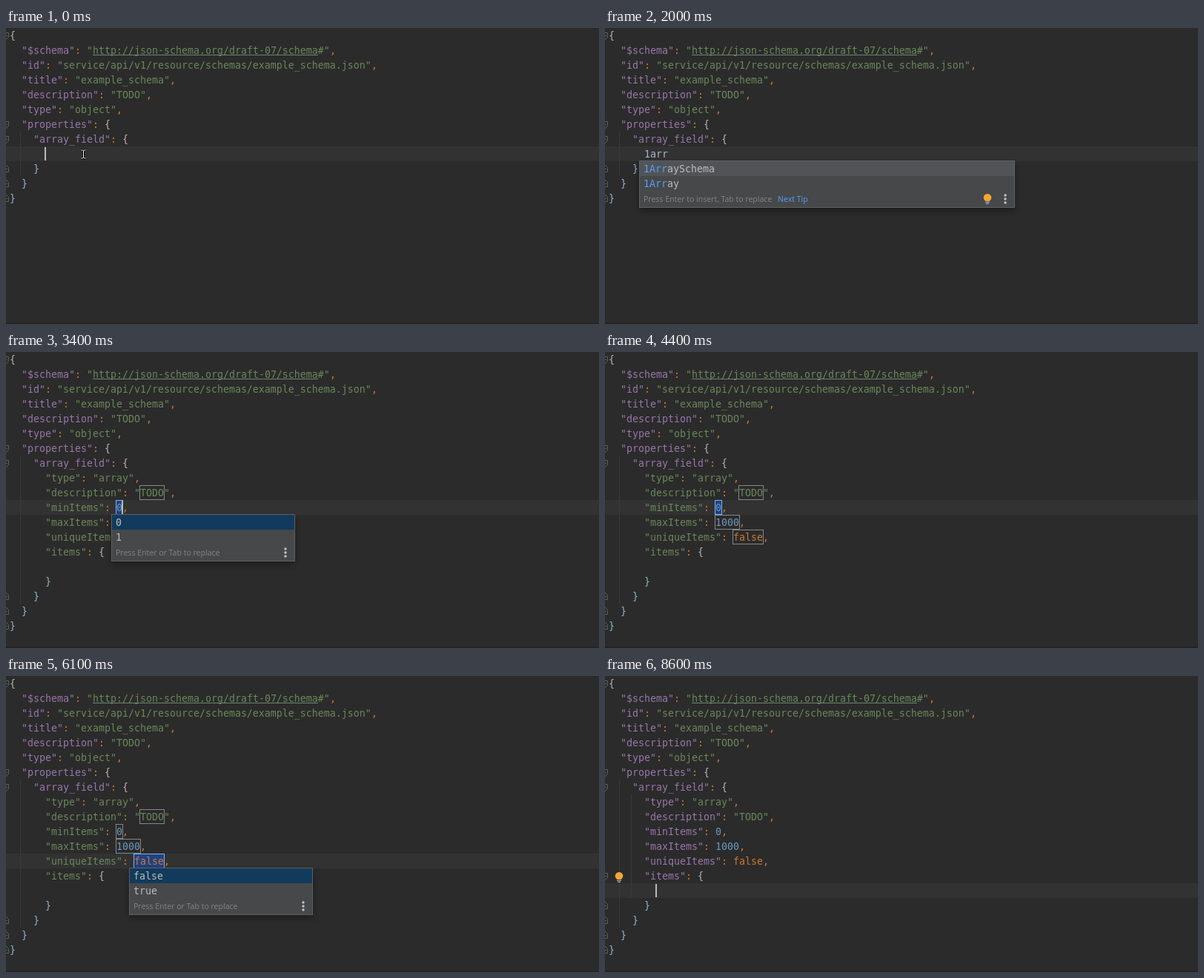
Recreate the animation shown at these times as an HTML page. Size 800 px wide and 400 px high, loop 8900 ms.

```html
<!DOCTYPE html>
<html lang="en">
<head>
<meta charset="utf-8">
<title>JSON schema live template</title>
<style>
  html, body { margin: 0; width: 100%; height: 100%; overflow: hidden; background: #2b2b2b; }
  svg { display: block; width: 800px; height: 400px; }
  .code { font: 13.29px "DejaVu Sans Mono", monospace; white-space: pre; }
  .hint { font: 10.55px "Open Sans", "Noto Sans", sans-serif; }
</style>
</head>
<body>
<svg viewBox="0 0 800 400" xmlns="http://www.w3.org/2000/svg">
  <defs>
    <filter id="shadow" x="-20%" y="-20%" width="140%" height="160%">
      <feDropShadow dx="0" dy="4" stdDeviation="5" flood-color="#000" flood-opacity=".35"/>
    </filter>
  </defs>
  <g id="stage"></g>
</svg>
<script>
const LOOP = 8900;
const stage = document.getElementById('stage');
const C = {
  key: '#9876aa', str: '#6a8759', punct: '#cc7832', num: '#6897bb',
  plain: '#a9b7c6', open: '#b8b4b2', close: '#8fb3c9', link: '#589df6', item: '#bbbbbb'
};

const head = [
  '{',
  '  "$schema": "http://json-schema.org/draft-07/schema#",',
  '  "id": "service/api/v1/resource/schemas/example_schema.json",',
  '  "title": "example_schema",',
  '  "description": "TODO",',
  '  "type": "object",',
  '  "properties": {',
  '    "array_field": {'
];
const body = [
  '      "type": "array",',
  '      "description": "TODO",',
  '      "minItems": 0,',
  '      "maxItems": 1000,',
  '      "uniqueItems": false,',
  '      "items": {',
  '',
  '      }'
];
const tail = ['    }', '  }', '}'];

// Template fields; each popup is open between from and to.
const fields = [
  { row: 9, col: 22, len: 4, from: 2500, to: 3300, items: ['TODO'] },
  { row: 10, col: 18, len: 1, from: 3400, to: 4400, items: ['0', '1'] },
  { row: 11, col: 18, len: 4, from: 4500, to: 5200, items: ['1000', '500', '200', '100', '50', '10', '5', '1'] },
  { row: 12, col: 21, len: 5, from: 5300, to: 6800, items: ['false', 'true'] }
];
const caretOn = [[0, 200], [400, 1900], [2500, 3100], [3400, 4100], [4500, 5200], [5300, 6100], [6600, 8100], [8600, LOOP]];

const within = (t, a, b) => t >= a && t < b;
const colX = col => 5 + 8 * col;
const rect = (x, y, w, h, fill, more = '') =>
  `<rect x="${x}" y="${y}" width="${w}" height="${h}" fill="${fill}" ${more}/>`;
const text = (x, y, s, fill, cls = 'code') =>
  `<text class="${cls}" x="${x}" y="${y}" fill="${fill}">${s}</text>`;

function tint(tok, rest, keyColor) {
  if (tok[0] === '"') return rest[0] === ':' ? keyColor : C.str;
  if (tok === '{') return C.open;
  if (tok === '}') return C.close;
  if (/^\d+$/.test(tok)) return C.num;
  return /^(false|[:,])$/.test(tok) ? C.punct : C.plain;
}

function codeLine(line, row, keyColor) {
  return [...line.matchAll(/"[^"]*"|\w+|[{}:,]/g)].map(m =>
    text(colX(m.index), row * 20 + 15, m[0], tint(m[0], line.slice(m.index + m[0].length), keyColor))
  ).join('');
}

function fold(row, isEnd) {
  const y = row * 20;
  const d = isEnd
    ? `M-.5 ${y + 4.5}L3.5 ${y + 8.5}V${y + 14.5}H-1M0 ${y + 10.5}H2`
    : `M-1 ${y + 6.5}H3.5V${y + 12}L-.5 ${y + 16.5}M0 ${y + 10.5}H2`;
  return `<path d="${d}" fill="none" stroke="#5c5f61"/>`;
}

const guide = (x, top, end) => rect(x, top * 20, 1, (end - top) * 20, '#393939');

const bulb = (x, y) =>
  `<path d="M${x - 2.5} ${y + 10}Q${x - 5.3} ${y + 8} ${x - 5.3} ${y + 5.2}A5.3 5.2 0 0 1 ${x + 5.3} ${y + 5.2}Q${x + 5.3} ${y + 8} ${x + 2.5} ${y + 10}Z" fill="#f2a733"/>` +
  rect(x - 3, y + 10.8, 6, 1.2, '#a8abad') + rect(x - 2, y + 12.8, 4, 1.2, '#a8abad');

function popup({ row, col, width, items, sel, selFill, match = 0, hint, tip, lit }) {
  const x = colX(col) - 7, y = row * 20 + 19, right = x + width;
  const h = items.length * 20 + 24, foot = y + h - 23;
  let out = rect(x, y, width, h, '#5e6163', 'filter="url(#shadow)"') +
    rect(x + 1, y + 1, width - 2, h - 2, '#46484a') +
    rect(x + 1, y + 1 + sel * 20, width - 2, 20, selFill);
  items.forEach((s, i) => {
    const base = y + 16 + i * 20;
    out += text(x + 6, base, s.slice(0, match), C.link) +
      text(x + 6 + 8 * match, base, s.slice(match), C.item);
  });
  out += text(x + 6, foot + 15, hint, '#828486', 'hint');
  if (tip) out += text(x + 187, foot + 15, tip, C.link, 'hint');
  for (const dy of [6, 11, 16])
    out += `<circle cx="${right - 13}" cy="${foot + dy}" r="1.75" fill="#c0c3c5"/>`;
  return out + (lit ? bulb(right - 37, foot + 4) : '');
}

function fieldBox(f, active) {
  const x = colX(f.col) - .5, y = f.row * 20 + .5;
  return rect(x, y, f.len * 8 + 1, 19, active ? '#214283' : 'none',
    `stroke="${active ? '#7fb1ea' : '#858789'}"`);
}

function suggestions(t, typed) {
  const moved = t >= 2200;
  return popup({
    row: 8, col: 6, width: 507,
    items: ['1ArraySchema', '1Array'].concat(t < 900 ? ['1Object', '1String'] : []),
    sel: moved ? 1 : 0, selFill: moved ? '#113a5c' : '#515457',
    match: typed.length, hint: 'Press Enter to insert, Tab to replace', tip: 'Next Tip',
    lit: within(t, 2000, 2200)
  });
}

function ibeam(x, y) {
  const d = `M${x - 3} ${y - 5.5}H${x - 1}L${x} ${y - 4.5}L${x + 1} ${y - 5.5}H${x + 3}M${x} ${y - 4.5}V${y + 4.5}M${x - 3} ${y + 5.5}H${x - 1}L${x} ${y + 4.5}L${x + 1} ${y + 5.5}H${x + 3}`;
  return `<path d="${d}" fill="none" stroke="#000" stroke-width="3"/><path d="${d}" fill="none" stroke="#fff"/>`;
}

function draw(t) {
  const expanded = t >= 2500, done = t >= 6800, parsed = t >= 7100, folded = t >= 7200;
  const typed = '1arr'.slice(0, [400, 900, 1200, 1400].filter(k => t >= k).length);
  const block = expanded ? body : ['      ' + typed];
  const lines = [...head, ...block, ...tail];
  const last = lines.length - 1;
  const field = expanded && !done ? fields.filter(f => t >= f.from).pop() : null;
  const pos = field ? [field.row, field.col + field.len] : done ? [14, 8] : [8, 6 + typed.length];

  let out = rect(0, 0, 800, 400, '#2b2b2b') + rect(0, 398, 800, 2, '#242424') +
    rect(0, pos[0] * 20, 800, 20, '#323232') + guide(19, 7, last - 1);
  if (folded) out += guide(35, 8, 15) + fold(13) + fold(15, true);
  for (const r of [0, 6, 7]) out += fold(r);
  for (let r = last - 2; r <= last; r++) out += fold(r, true);

  if (field) for (const f of fields) out += fieldBox(f, f === field);
  lines.forEach((s, r) => {
    const fresh = expanded && !parsed && r >= 8;
    out += codeLine(s, r, fresh ? C.str : C.key);
  });
  out += rect(117, 36, 304, 1, '#6a8770');

  if (caretOn.some(([a, b]) => within(t, a, b)))
    out += rect(colX(pos[1]) - 1, pos[0] * 20 + 1, 2, 18, '#bbbbbb');
  if (within(t, 400, 2400)) out += suggestions(t, typed);
  if (field && t < field.to)
    out += popup({ ...field, width: 248, sel: 0, selFill: '#113a5c', hint: 'Press Enter or Tab to replace' });
  if (t >= 7700) out += bulb(19, 265);
  if (t < 400) out += ibeam(104.5, 170.5);
  return out;
}

let shown = '';
function tick() {
  const next = draw(performance.now() % LOOP);
  if (next !== shown) stage.innerHTML = shown = next;
  requestAnimationFrame(tick);
}
tick();
</script>
</body>
</html>
```
